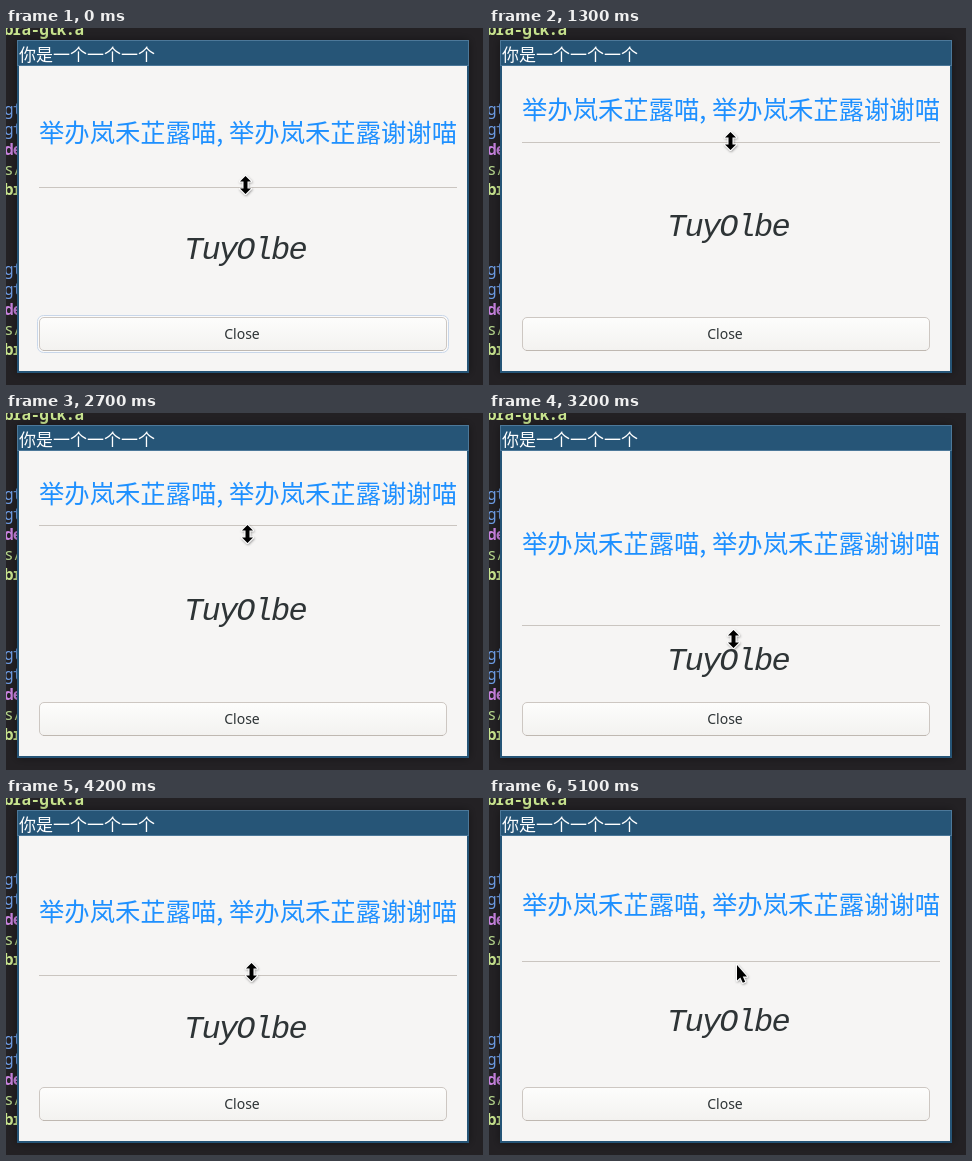
Recreate the animation shown at these times as an HTML page. Size 477x357 px, loop 5.8 s.

```html
<!DOCTYPE html>
<html lang="zh-CN">
<head>
<meta charset="utf-8">
<title>Paned dialog</title>
<style>
  html, body { margin: 0; width: 100%; height: 100%; overflow: hidden; background: #232124; }
  svg { display: block; width: 477px; height: 357px; }
  text { white-space: pre; }
  .cjk { font-family: "Noto Sans CJK SC", "Noto Sans CJK JP", "Noto Sans CJK", sans-serif; }
  .term { font: 16px "Noto Sans Mono", monospace; letter-spacing: -0.8px; }
  .bold { font-weight: 700; }
  .name { font: italic 32px "Liberation Mono", monospace; letter-spacing: -1.8px; }
  .label { font: 14px "Noto Sans", "Open Sans", sans-serif; }
  .pointer { fill: #000; stroke: #fff; stroke-width: 1.8; stroke-linejoin: round; paint-order: stroke; }
</style>
</head>
<body>
<svg viewBox="0 0 477 357">
  <defs>
    <clipPath id="topClip"><rect id="topPane" x="13" y="48" width="448" height="0"/></clipPath>
    <clipPath id="lowClip"><rect id="lowPane" x="13" y="0" width="448" height="0"/></clipPath>
    <linearGradient id="face" x1="0" y1="0" x2="0" y2="1">
      <stop offset="0" stop-color="#fdfdfc"/>
      <stop offset="1" stop-color="#f3f2f0"/>
    </linearGradient>
    <filter id="shadow" x="-50%" y="-50%" width="200%" height="200%">
      <feDropShadow dx="0.6" dy="1" stdDeviation="0.9" flood-opacity="0.4"/>
    </filter>
    <filter id="glow">
      <feDropShadow dx="0" dy="0" stdDeviation="4" flood-opacity="0.4"/>
    </filter>
  </defs>

  <rect width="477" height="357" fill="#232124"/>
  <g id="terminal" class="term"></g>

  <rect x="11" y="12" width="452" height="333" fill="#285577" filter="url(#glow)"/>
  <rect x="11.5" y="12.5" width="451" height="25" fill="none" stroke="#4c7899"/>
  <rect x="13" y="38" width="448" height="305" fill="#f6f5f4"/>
  <text class="cjk" x="13" y="33" font-size="17" fill="#fff">你是一个一个一个</text>

  <g clip-path="url(#topClip)">
    <text id="phrase" class="cjk" x="33" font-size="25.33" fill="#1e90ff">举办岚禾芷露喵, 举办岚禾芷露谢谢喵</text>
  </g>
  <g clip-path="url(#lowClip)">
    <text id="name" class="name" x="239" text-anchor="middle" fill="#2e3436">TuyOlbe</text>
  </g>
  <rect id="handle" x="33" width="418" height="1" fill="#cac5c0"/>

  <rect id="focus" x="31.5" y="287.5" width="411" height="37" rx="6" fill="#fbfbfb" stroke="#c8d6e9"/>
  <rect x="33.5" y="289.5" width="407" height="33" rx="4.5" fill="url(#face)" stroke="#cdc7c2"/>
  <path d="M37 322.5H437" stroke="#bfb8b1"/>
  <text class="label" x="236" y="311" text-anchor="middle" fill="#2e3436">Close</text>

  <g class="pointer" filter="url(#shadow)">
    <path id="resize" d="M0-9L5.5-3.6H2V3.6H5.5L0 9L-5.5 3.6H-2V-3.6H-5.5Z"/>
    <path id="arrow" d="M248 167V182.5L251.3 179.4L253.8 184.8L256.2 183.7L253.8 178.5H258Z"/>
  </g>
</svg>
<script>
  const LOOP = 5800, STEP = 100;
  const PANE_TOP = 48, PANE_BOTTOM = 279;

  // Main poses of the drag: time, handle y, pointer y, pointer x.
  const poses = [
    [900, 159, 157, 239.5],
    [1300, 114, 113, 241.5],
    [1800, 56, 58, 241.5],
    [2000, 44, 37, 241.5],
    [2200, 44, 37, 241.5],
    [2700, 112, 121, 241.5],
    [3200, 212, 226, 244.5],
    [3700, 282, 304, 245],
    [4200, 177, 174, 245.5],
    [4400, 144, 143, 246],
    [4500, 144, 143, 246],
    [4800, 163, 167, 247]
  ];

  const $ = id => document.getElementById(id);
  const set = (id, attrs) => {
    for (const key in attrs) $(id).setAttribute(key, attrs[key]);
  };
  const show = (id, on) => { $(id).style.display = on ? "" : "none"; };
  const clamp = (v, lo, hi) => Math.min(Math.max(v, lo), hi);

  // Slope of a column at pose i; flat at the ends, at rests and where the motion turns.
  function slope(i, col) {
    const [a, b, c] = [poses[i - 1], poses[i], poses[i + 1]];
    if (!a || !c || (b[col] - a[col]) * (c[col] - b[col]) <= 0) return 0;
    return (c[col] - a[col]) / (c[0] - a[0]);
  }

  // Cubic Hermite curve through one column of the poses.
  function valueAt(t, col) {
    const last = poses.length - 1;
    t = clamp(t, poses[0][0], poses[last][0]);
    const i = Math.max(1, poses.findIndex(p => p[0] >= t));
    const a = poses[i - 1], b = poses[i], span = b[0] - a[0];
    const u = (t - a[0]) / span, v = 1 - u;
    return v * v * (1 + 2 * u) * a[col] + u * u * (1 + 2 * v) * b[col]
      + span * u * v * (v * slope(i - 1, col) - u * slope(i, col));
  }

  function addLine(str, y, fill, bold) {
    const el = document.createElementNS("http://www.w3.org/2000/svg", "text");
    el.textContent = str;
    el.setAttribute("x", -2);
    el.setAttribute("y", y);
    el.setAttribute("fill", fill);
    if (bold) el.setAttribute("class", "bold");
    $("terminal").append(el);
  }

  addLine("bra-gtk.a", 7, "#c9e58f", true);
  for (const y of [87, 247]) {
    addLine("gt", y, "#6f9fe8");
    addLine("gt", y + 20, "#6f9fe8");
    addLine("de", y + 40, "#c983e0", true);
    addLine("s/", y + 60, "#b5d68c");
    addLine("br", y + 80, "#c9e58f", true);
  }

  function draw(time) {
    const t = Math.floor(time / STEP) * STEP;
    const sep = Math.round(clamp(valueAt(t, 1), PANE_TOP + 2, PANE_BOTTOM - 3));
    const pointerY = Math.round(valueAt(t, 2));
    const pointerX = Math.floor(valueAt(t, 3)) + 0.5;

    // Labels stay centred until their pane is too small, then stick to the handle.
    const phraseMid = Math.min((sep + 50.5) / 2, sep - 17.5);
    const nameMid = Math.max(139.5 + sep / 2, sep + 23.5);

    set("topPane", { height: Math.max(0, sep - 2 - PANE_TOP) });
    set("lowPane", { y: sep + 3, height: Math.max(0, PANE_BOTTOM - sep - 3) });
    set("phrase", { y: Math.round(phraseMid + 9) });
    set("name", { y: Math.round(nameMid + 11.5) });
    set("handle", { y: sep });
    set("resize", { transform: `translate(${pointerX} ${pointerY})` });
    show("focus", t < 100);
    show("resize", t < 5100);
    show("arrow", t >= 5100);
  }

  const t0 = performance.now();
  function tick() {
    draw((performance.now() - t0) % LOOP);
    requestAnimationFrame(tick);
  }
  tick();
</script>
</body>
</html>
```
